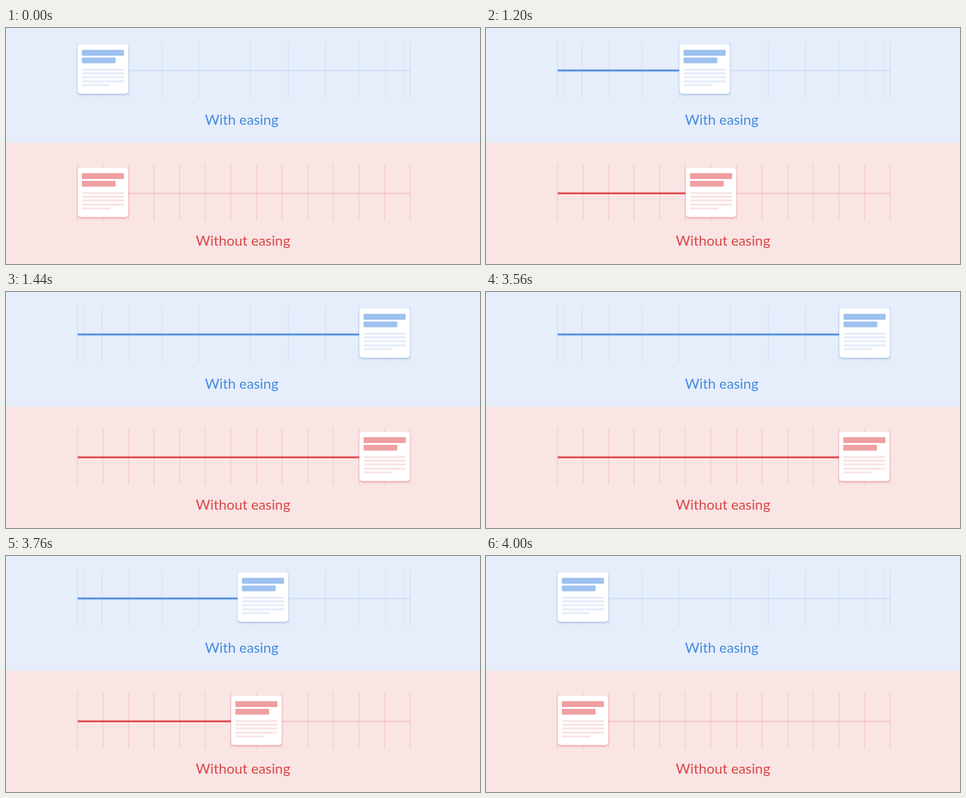
Animation, 800 px wide and 400 px high, one loop 5000 ms. Source, as an HTML page:

```html
<!DOCTYPE html>
<html lang="en">
<head>
<meta charset="utf-8">
<title>Easing comparison</title>
<style>
  html, body { margin: 0; width: 100%; height: 100%; overflow: hidden; }
  svg { display: block; width: 800px; height: 400px; }
  text { font: 23.8px Lato, "Open Sans", sans-serif; text-anchor: middle; }
</style>
</head>
<body>
<svg id="stage" viewBox="0 0 800 400"></svg>
<script>
const NS = 'http://www.w3.org/2000/svg';
const stage = document.getElementById('stage');

const LOOP = 5000, STEP = 40, STEPS = 11;
const OUT = 1000, BACK = 3560;
const START = 121, CARD = 85.3, TRAVEL = 475.5;

const linear = t => t;
const smooth = t => t * t * (3 - 2 * t);

function add(parent, tag, attrs) {
  const el = document.createElementNS(NS, tag);
  for (const key in attrs) el.setAttribute(key, attrs[key]);
  return parent.appendChild(el);
}

const rect = (parent, x, y, width, height, fill, rx = 0) =>
  add(parent, 'rect', { x, y, width, height, fill, rx });

function drawCard(parent, y, c) {
  const card = add(parent, 'g', {});
  const body = rect(card, 0, y, CARD, 83.5, '#fff', 5.5);
  body.style.filter = `drop-shadow(0 2.6px 1.8px ${c.shadow})`;
  rect(card, 7.1, y + 9, 71, 10, c.bar, 1);
  rect(card, 7.1, y + 22, 56.8, 9.7, c.bar, 1);
  [41, 47.3, 53.6, 60.7, 67].forEach((dy, i) =>
    rect(card, 7.1, y + dy, i < 4 ? 71 : 48, 3.5, c.line, 1.5));
  return card;
}

// Left card edges up to one step, right card edges from another.
function ticks(ease, lastLeft, firstRight) {
  const xs = [];
  for (let k = 0; k <= STEPS; k++) {
    const x = START - .5 + TRAVEL * ease(k / STEPS);
    if (k <= lastLeft) xs.push(x);
    if (k >= firstRight) xs.push(x + CARD + .8);
  }
  return xs;
}

function play(el, ease, nudge, toFrame) {
  const frames = [];
  const key = (time, x) => frames.push({ offset: time / LOOP, easing: 'steps(1, end)', ...toFrame(x) });
  key(0, START);
  for (let k = 1; k <= STEPS; k++) key(OUT + k * STEP, START + TRAVEL * ease(k / STEPS));
  for (let k = 0; k <= STEPS; k++) {
    key(BACK + k * STEP, START + (TRAVEL - nudge) * ease(1 - k / STEPS));
  }
  key(LOOP, START);
  el.animate(frames, { duration: LOOP, iterations: Infinity });
}

function track(o) {
  const c = o.colors;
  rect(stage, 0, o.top, 800, o.height, c.back);
  for (const x of ticks(o.ease, o.lastLeft, o.firstRight)) {
    rect(stage, x - .9, o.tickY, 1.8, 95.5, c.tick);
  }
  rect(stage, 120.5, o.railY - 1.5, 561.5, 3, c.rail);
  const done = rect(stage, 0, o.railY - 1.5, 1, 3, c.done);
  const card = drawCard(stage, o.cardY, c);
  play(done, o.ease, o.nudge, x => ({ transform: `translateX(${START}px) scaleX(${x - START + .01})` }));
  play(card, o.ease, o.nudge, x => ({ transform: `translateX(${x}px)` }));
  add(stage, 'text', { x: o.textX, y: o.textY, fill: c.text }).textContent = o.label;
}

track({
  label: 'With easing', textX: 397.8, textY: 164.3,
  top: 0, height: 195, tickY: 24, railY: 72, cardY: 28,
  ease: smooth, lastLeft: 5, firstRight: 5, nudge: 0,
  colors: {
    back: '#e6edfb', tick: 'rgba(160,198,225,.21)', rail: 'rgba(160,198,228,.28)',
    done: '#4a8ce0', text: '#438bdd', bar: '#9fc1ee', line: '#e4edfa',
    shadow: 'rgba(90,130,180,.45)'
  }
});

track({
  label: 'Without easing', textX: 400, textY: 369.3,
  top: 194.5, height: 205.5, tickY: 231, railY: 280.2, cardY: 237,
  ease: linear, lastLeft: 2, firstRight: 1, nudge: .5,
  colors: {
    back: '#f9e5e4', tick: 'rgba(238,140,150,.25)', rail: 'rgba(238,140,150,.28)',
    done: '#dc4649', text: '#dc4549', bar: '#ee9fa1', line: '#fae4e4',
    shadow: 'rgba(225,85,95,.5)'
  }
});
</script>
</body>
</html>
```
